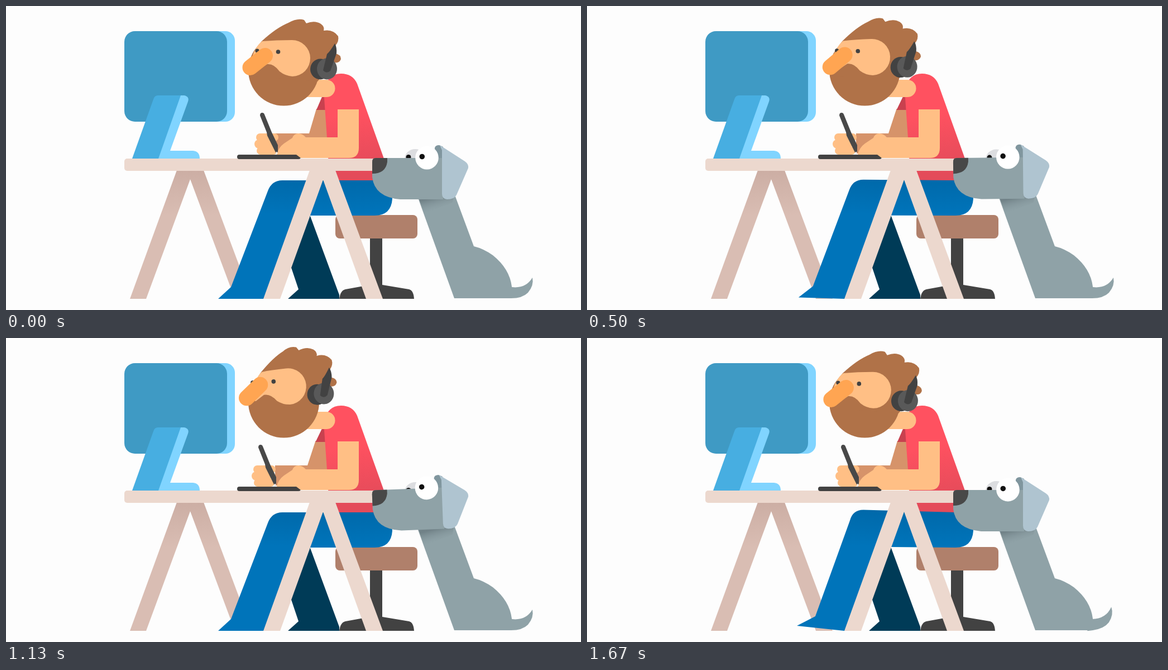
Write an HTML page with a canvas that moves like this. It is 1030 by 544 pixels and loops after 1710 ms.

```html
<!DOCTYPE html>
<html lang="en">
<head>
<meta charset="utf-8">
<title>At the desk</title>
<style>
html, body { margin: 0; width: 100%; height: 100%; overflow: hidden; background: #fdfdfd; }
canvas { display: block; }
</style>
</head>
<body>
<canvas id="stage" width="1030" height="544"></canvas>
<script>
const ctx = document.getElementById('stage').getContext('2d');
const LOOP = 1710, TAP = LOOP / 5;
const SKIN = '#ffbf85', TAN = '#d6936a', HAIR = '#b07248', DARK = '#424242';
const WOOD = '#ecd8ce', BLUE = '#0074ba', DOG = '#8fa2a7';

function shape(d, color) {
  ctx.fillStyle = color;
  ctx.fill(new Path2D(d));
}

function oval(x, y, rx, ry, color) {
  ctx.fillStyle = color;
  ctx.beginPath();
  ctx.ellipse(x, y, rx, ry, 0, 0, Math.PI * 2);
  ctx.fill();
}

function box(x, y, w, h, r, color) {
  ctx.fillStyle = color;
  ctx.beginPath();
  ctx.roundRect(x, y, w, h, r);
  ctx.fill();
}

function fade(x0, y0, x1, y1, from, to) {
  const g = ctx.createLinearGradient(x0, y0, x1, y1);
  g.addColorStop(0, from);
  g.addColorStop(1, to);
  return g;
}

function posed(x, y, angle, draw) {
  ctx.save();
  ctx.translate(x, y);
  ctx.rotate(angle);
  ctx.translate(-x, -y);
  draw();
  ctx.restore();
}

function shifted(x, y, draw) {
  ctx.save();
  ctx.translate(x, y);
  draw();
  ctx.restore();
}

function ease(a, b, t) {
  const x = Math.min(1, Math.max(0, (t - a) / (b - a)));
  return x * x * (3 - 2 * x);
}

// Rises over a..b, falls back over c..d
const pulse = (t, a, b, c, d) => ease(a, b, t) - ease(c, d, t);

function monitor() {
  box(230, 45, 180, 162, 17, '#80d4ff');
  box(212, 45, 184, 162, 19, '#3f9ac4');
  shape('M300 160H319Q329 162 326 171L294 259H335Q347 260 347 273H260Z', '#80d4ff');
  shape('M272 160H313L273 273H226L264 167Q266 160 272 160Z', '#47aee1');
}

function backLegs() {
  shape('M306 294L222 524H251L330 310L410 524H440L354 294Z',
    fade(0, 295, 0, 375, '#ccaea4', '#d9bdb3'));
}

function stool() {
  box(652, 410, 22, 100, 0, DARK);
  shape('M597 524Q599 509 608 507L652 499H674L722 507Q730 509 731 524Z', DARK);
  box(590, 374, 147, 42, 8, '#b0806b');
}

function farLeg() {
  shape('M480 376H545L597 517V524H505L524 507Z', '#003b57');
}

function farArm(hand) {
  const x = 543 - 3 * hand, cuff = 556 - 1.5 * hand;
  shape(`M${cuff} 184L${x} 228H482V264H580V184Z`, TAN);
  shape(`M568 158L${cuff} 186H575V158Z`, '#c8414f');
}

function torso() {
  shape('M569 150Q576 121 600 121Q621 121 629 139L677 273L692 320H580L575 236Z',
    fade(610, 195, 625, 290, '#ff5160', '#e44b5a'));
}

function nearLeg(lift) {
  const k = 312 - 4.5 * lift, toeX = 380 - 4 * lift, toeY = 524 - 9 * lift;
  const ax = 403 + 6 * lift, ay = 503 - 5 * lift;
  shape(`M495 ${k}L660 312H684Q692 330 692 345Q690 375 660 375
    L545 ${375 - lift}L488 524H461L${toeX} ${toeY}L${ax} ${ay}
    L${469 + 2 * lift} ${k + 19}Q476 ${k} 495 ${k}Z`,
    fade(0, 310, 0, 372, '#0069aa', BLUE));
}

function hands(hand) {
  box(414, 266, 114, 8, 4, DARK);
  shifted(-5 * hand, 0, () => {
    box(448, 228, 40, 14, 7, SKIN);
    box(445, 239, 36, 16, 8, SKIN);
    box(449, 252, 37, 14, 7, SKIN);
  });
  shape(`M485 266Q488 253 498 246L513 236Q516 228 524 228Q532 229 537 235H594V185H632V254
    Q632 272 614 272H528L520 266Z`, SKIN);
  shifted(-3 * hand, 0, () => {
    shape(`M455 196Q455 191 459 191Q462 191 463 194L476 226L487 249L487 262H483
      L477 250L468 232L467 226Z`, '#484848');
    oval(485, 263, 1.6, 2.2, '#f2e9e4');
  });
}

function table() {
  box(212, 273, 460, 22, 5, WOOD);
  shape('M544 294L461 524H491L568 311L645 524H675L590 294Z', WOOD);
}

function head(up) {
  // The front of the head slides back as it tilts
  const s = 9 * up;
  shape('M530 132H574A15.5 15.5 0 0 1 574 163H530Z', SKIN);
  oval(497.5, 115, 63.5, 63.5, HAIR);
  posed(442, 162, -0.1 * up, () => {
    shape(`M440 126L${441 + s} 92Q${446 + s} 76 ${458 + s} 63
      Q${484 + s * 0.8} 39 ${506 + s * 0.4} 30Q522 21 534 25L538 31
      Q553 25 564 32Q571 37 569 44Q586 41 595 54Q597 63 590 71V85
      Q600 87 600 95Q597 103 588 101L558 135Z`, HAIR);
    shape(`M440 103Q${440 + s} 88 ${447 + s} 77Q${452 + s} 68 ${459 + s} 63
      Q485 61 512 61A32.5 32.5 0 0 1 513 126
      Q500 125 490 117Q480 103 468 104L452 114Z`, SKIN);
    oval(450, 80, 3.6, 3.6, DARK);
    oval(487.5, 82, 3.8, 3.8, DARK);
    shifted(-up, -3.5 * up, () => {
      ctx.strokeStyle = '#ffa552';
      ctx.lineCap = 'round';
      ctx.lineWidth = 28;
      ctx.beginPath();
      ctx.moveTo(437.5, 110);
      ctx.lineTo(464, 89);
      ctx.stroke();
    });
    oval(563, 113, 18, 18.5, DARK);
    oval(575, 112.5, 18, 19, '#595959');
    shape('M589 67Q593 74 592 85L581 116Q574 122 568 115L575 86Q580 82 589 67Z', DARK);
  });
}

function dog(up, wag) {
  posed(905, 513, -0.13 * wag, () => {
    shape('M897 503H906Q931 506 943 486Q946 500 935 513Q925 523 905 523H895Z', DOG);
  });
  shape(`M735 335L803 523H906V502Q902 470 872 446Q855 434 838 430L802 333Z`, DOG);
  shape('M738 340L749 371L800 352L802 340Z',
    fade(764, 343, 771, 368, 'rgba(103,119,125,.75)', 'rgba(143,162,167,0)'));
  shifted(0, 2 * up, () => {
    oval(733, 274, 19, 18, '#dcdde0');
    oval(721, 270.5, 4.5, 4.5, '#111');
  });
  posed(668, 285, -0.038 * up, () => {
    shape('M768 274V254Q769 249 776 249L783 252V275Z', '#80969e');
    shape('M662 272H783V346H706Q660 342 656 306V279Q656 272 662 272Z', DOG);
    shape('M662 272H683V279Q680 300 656 300V279Q656 272 662 272Z', '#484848');
    shape(`M777 249L822 278Q829 283 828 290L807 338Q803 346 790 346
      Q781 345 781 336V258Z`, '#afc4d0');
    oval(754, 271.5, 20.8, 21, '#fff');
    oval(745.3, 269.5, 4.8, 4.8, '#111');
  });
}

function draw(now) {
  const t = now % LOOP;
  const up = pulse(t, 445, 605, 1460, 1690);
  const hand = pulse(t, 0, 350, 1130, 1450);
  const lift = pulse(t % TAP, 120, 230, 302, TAP);
  const wag = pulse(t, 1600, 1660, 1675, LOOP);

  ctx.fillStyle = '#fdfdfd';
  ctx.fillRect(0, 0, 1030, 544);
  monitor();
  backLegs();
  farLeg();
  stool();
  farArm(hand);
  torso();
  nearLeg(lift);
  table();
  hands(hand);
  head(up);
  dog(up, wag);
}

const start = performance.now();
function tick() {
  draw(performance.now() - start);
  requestAnimationFrame(tick);
}
tick();
</script>
</body>
</html>
```
